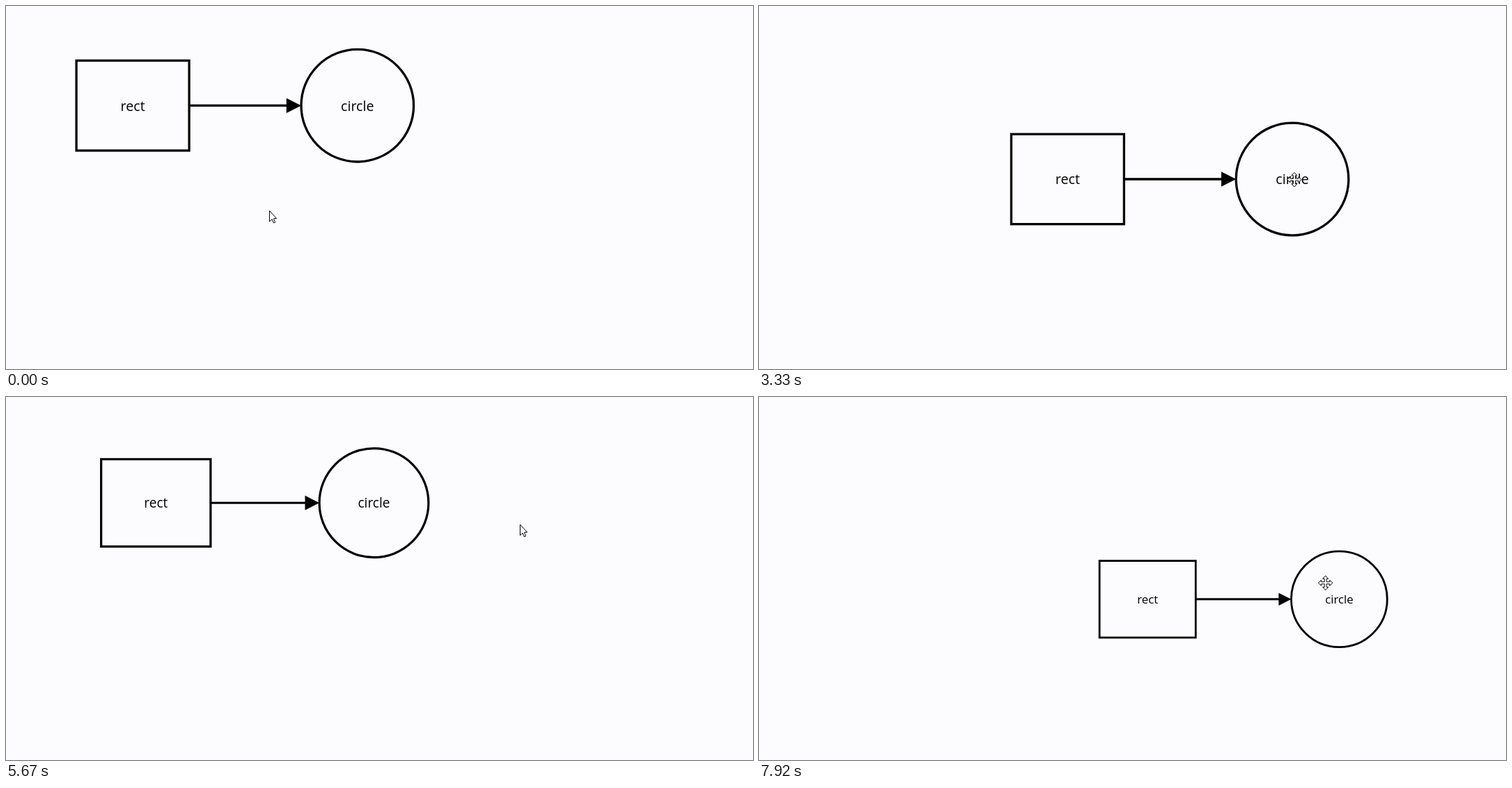
An HTML page for the animation above (8000 ms loop, 1073 by 522 pixels).

```html
<!DOCTYPE html>
<html lang="en">
<head>
<meta charset="utf-8">
<title>Diagram pan and zoom</title>
<style>
  html, body { margin: 0; width: 100%; height: 100%; overflow: hidden; background: #fcfcfe; }
  svg { display: block; width: 1073px; height: 522px; }
  text { font: 19.8px "Open Sans", "Noto Sans", sans-serif; text-anchor: middle; }
  .line { fill: none; stroke: #000; stroke-width: 3.3; }
  .anchor { fill: #fff; stroke: #000; stroke-width: 3.3; }
  .pointer { fill: #fff; stroke: #000; stroke-width: 1; }
</style>
</head>
<body>
<svg viewBox="0 0 1073 522">
  <!-- The diagram's origin is the centre of the circle -->
  <g id="diagram">
    <rect class="line" x="-403.7" y="-64.7" width="162" height="129.4"/>
    <text x="-322.7" y="7.4">rect</text>
    <path class="line" d="M-241.7 0H-98"/>
    <path d="M-80.8 0L-102 -10.7V10.7Z"/>
    <circle class="line" r="80.8"/>
    <text y="7.4">circle</text>
    <g id="anchors" class="anchor"></g>
  </g>
  <path id="arrow" class="pointer" d="M.5 .5V16L4.1 12.7L6.4 18L8.7 17L6.4 11.8L10.6 11.4Z"/>
  <path id="move" class="pointer" d="M0-10.3L4-6H1.5V-1.5H6V-4L10.3 0L6 4V1.5H1.5V6H4L0 10.3L-4 6H-1.5V1.5H-6V4L-10.3 0L-6-4V-1.5H-1.5V-6H-4Z"/>
</svg>
<script>
const LOOP = 8000, FRAME = 1000 / 12, RADIUS = 82, FULL_ZOOM = 1.7;
const LEAD = 20;                 // the diagram trails the pointer by this many ms
const ZOOM_ARM = [221, 35.4];    // from the circle to the zoom pivot
const WHEEL = [5580, 5830, 5915, 6165, 6250];

// Turning points of the dragged diagram: [ms, x, y]
const DRAG = [
  [333, 504.8, 143.2], [700, 598, 170], [1083, 528.9, 175.6],
  [2667, 528.9, 175.6], [3710, 866.3, 280], [4083, 667.8, 226.5],
  [4667, 526.7, 151.8], [4750, 522, 151.2],
  [7167, 522, 151.2], [7700, 853, 363], [8060, 773, 244]
];
// The pointer relative to the dragged diagram: it rests while it drags
const REACH = [
  [0, -126.8, 150.8], [250, -149.8, 145.8], [1083, -149.8, 145.8],
  [1640, -6, -2], [4750, -6, -2], [5400, 216, 31.8],
  [6333, 216, 31.8], [6583, 166.5, 29.8], [7083, 19, -9]
];

const byId = id => document.getElementById(id);
const diagram = byId('diagram'), anchors = byId('anchors');
const arrow = byId('arrow'), move = byId('move');

for (let angle = 0; angle < 360; angle += 90)
  anchors.innerHTML += `<circle cx="80.8" r="6.6" transform="rotate(${angle})"/>`;

// Smooth interpolation that never overshoots its keys
function track(keys, t, axis) {
  const last = keys.length - 1;
  if (t <= keys[0][0]) return keys[0][axis];
  if (t >= keys[last][0]) return keys[last][axis];
  const i = keys.findIndex(key => key[0] > t) - 1;
  const slope = j => j < 0 || j >= last ? 0
    : (keys[j + 1][axis] - keys[j][axis]) / (keys[j + 1][0] - keys[j][0]);
  const tangent = j => {
    const a = slope(j - 1), b = slope(j);
    return a * b > 0 ? 2 * a * b / (a + b) : 0;
  };
  const span = keys[i + 1][0] - keys[i][0], u = (t - keys[i][0]) / span, v = 1 - u;
  return keys[i][axis] * v * v * (1 + 2 * u) + keys[i + 1][axis] * u * u * (3 - 2 * u)
    + span * u * v * (tangent(i) * v - tangent(i + 1) * u);
}
const point = (keys, t) => [track(keys, t, 1), track(keys, t, 2)];

const show = (el, on) => el.setAttribute('visibility', on ? 'visible' : 'hidden');
const place = (el, [x, y], scale = 1) =>
  el.setAttribute('transform', `translate(${x} ${y}) scale(${scale})`);

function render(t) {
  const notches = WHEEL.filter(time => time <= t + 4).length;
  const scale = 1 - notches * 0.05 / FULL_ZOOM;
  const center = point(DRAG, t).map((p, i) => p + ZOOM_ARM[i] * (1 - scale));
  const reach = point(REACH, t);
  const cursor = point(DRAG, t + LEAD).map((p, i) => p + reach[i]);
  const pressed = t > 2245 && t < 4780 || t > 7160;
  const hover = Math.hypot(cursor[0] - center[0], cursor[1] - center[1]) < RADIUS * scale;

  place(diagram, center, scale);
  place(arrow, cursor);
  place(move, cursor);
  show(anchors, hover && !pressed);
  show(move, hover);
  show(arrow, !hover);
}

const start = performance.now();
function tick() {
  const t = (performance.now() - start) % LOOP;
  render(Math.floor((t + 3.4) / FRAME) % 96 * FRAME);
  requestAnimationFrame(tick);
}
tick();
</script>
</body>
</html>
```
